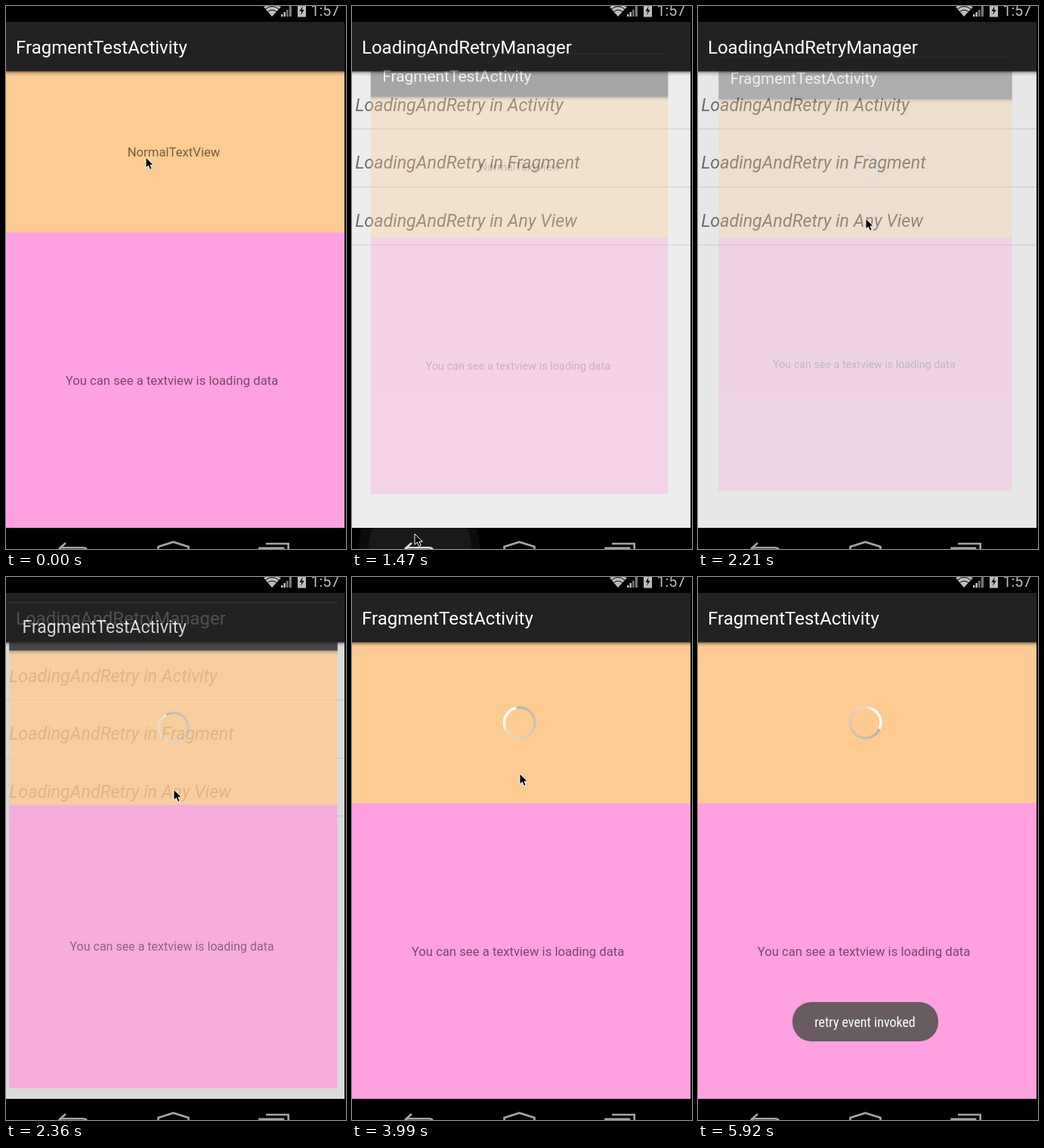
These frames come from a looping animation (450 px wide and 718 px high, 5.99 s). An HTML page:

```html
<!DOCTYPE html>
<html lang="en">
<head>
<meta charset="utf-8">
<title>Loading and retry</title>
<style>
  html, body { margin: 0; width: 100%; height: 100%; overflow: hidden; background: #000; }
  svg { display: block; width: 100%; height: 100%; }
  text { font-family: Roboto, sans-serif; }
  .title { font-size: 24px; fill: #fff; }
  .item { font-size: 23.25px; font-style: italic; fill: #000; fill-opacity: .54; }
  .label { font-size: 16.7px; fill: #000; fill-opacity: .54; text-anchor: middle; }
  .toast { font-size: 18px; font-stretch: condensed; font-family: "Roboto Condensed", Roboto, sans-serif; fill: #fff; text-anchor: middle; }
</style>
</head>
<body>
<svg viewBox="0 0 450 718">
  <defs>
    <linearGradient id="shade" x1="0" y1="0" x2="0" y2="1">
      <stop offset="0" stop-color="#000" stop-opacity=".5"/>
      <stop offset=".4" stop-color="#000" stop-opacity=".14"/>
      <stop offset="1" stop-color="#000" stop-opacity="0"/>
    </linearGradient>
    <clipPath id="navClip"><rect y="690" width="448" height="28"/></clipPath>
  </defs>

  <g id="list">
    <rect y="20" width="448" height="670" fill="#ededed"/>
    <rect y="20" width="448" height="66.5" fill="#222"/>
    <rect y="86.5" width="448" height="6" fill="url(#shade)"/>
    <text class="title" x="13" y="62.7">LoadingAndRetryManager</text>
    <text class="item" x="4.2" y="138.5">LoadingAndRetry in Activity</text>
    <text class="item" x="4.2" y="215.2">LoadingAndRetry in Fragment</text>
    <text class="item" x="4.2" y="292">LoadingAndRetry in Any View</text>
    <path d="M0 162.5H448M0 239.5H448M0 316H448" stroke="#cfcfcf" fill="none"/>
  </g>
  <rect id="dim" y="87" width="448" height="603"/>

  <g id="page">
    <rect x="-5" y="20" width="453" height="66.5" fill="#222"/>
    <rect x="-5" y="20" width="453" height="1" fill="#4a4a4a"/>
    <rect x="-5" y="86.5" width="453" height="213" fill="#fecb92"/>
    <rect x="-5" y="299.3" width="453" height="390.7" fill="#ffa1e0"/>
    <rect x="-5" y="86.5" width="453" height="6" fill="url(#shade)"/>
    <text class="title" x="13" y="62.7">FragmentTestActivity</text>
    <text class="label" id="content" x="222" y="199">NormalTextView</text>
    <text class="label" x="219.5" y="500.5">You can see a textview is loading data</text>
    <g id="spinner" transform="translate(221.7 192.7)" fill="none" stroke-width="3.4"></g>
  </g>

  <g id="toast">
    <rect x="125" y="562" width="193" height="52" rx="25" fill="#665c62"/>
    <text class="toast" x="221" y="595">retry event invoked</text>
  </g>

  <rect width="450" height="21"/>
  <rect x="448" width="2" height="718"/>
  <rect y="690" width="450" height="28"/>

  <g fill="#bdbdbd">
    <path d="M352 14L341 1L344 0H360L364 1Z"/>
    <path d="M343.5 4Q352 -3 361 4M346.5 7.5Q352 3 358 7.5" fill="none" stroke="#000" stroke-width="1"/>
    <path d="M364 14V11H366.5V14ZM367.5 14V8H370V14Z"/>
    <path d="M371 14V5H373.5V14ZM374.7 14V0H378V14Z" fill="#777"/>
    <path d="M386 0H397V14.5H386Z"/>
    <path d="M392.5 0L388.5 7H391.3L390 12L394.7 5H392Z" fill="#111"/>
    <text x="403.5" y="13" font-size="19.5">1:57</text>
  </g>

  <g id="ripple" clip-path="url(#navClip)">
    <circle cx="89" cy="717" r="80" fill="#1b1b1b"/>
    <circle cx="90" cy="717" r="68" fill="#353535"/>
  </g>
  <g fill="none" stroke="#a5a5a5" stroke-width="2.6">
    <path id="back" d="M79 710L71 717L73 719M72 716.3H102Q106 716.3 107 719"/>
    <path d="M201.5 719V715L221.5 708.7L241.5 715V719"/>
    <path d="M344 711H373.7V719M335.5 719V716.7H367V719"/>
  </g>
  <path id="cursor" d="M0 0V14.2L3.3 11.2L5.6 16.4L8.2 15.2L6 10.2H10.4Z" stroke="#fff" stroke-width="1"/>
</svg>

<script>
const LOOP = 5990, FIRST = 580, TICK = 147.6;
const CLOSE = 1276, OPEN = 2120, RETRY = 4130, RELOAD = 4500;
const PARTS = 60, STEP = 360 / PARTS, RADIUS = 20.2;
const NS = "http://www.w3.org/2000/svg";

const $ = id => document.getElementById(id);
const fade = (id, v) => $(id).setAttribute("opacity", v);
const rad = a => a * Math.PI / 180;
const ramp = (t, start, length) => Math.min(1, Math.max(0, (t - start) / length));
const mix = (a, b, k) => a.map((v, i) => v + (b[i] - v) * k);

const point = a => `${RADIUS * Math.cos(rad(a))} ${RADIUS * Math.sin(rad(a))}`;
const segs = Array.from({ length: PARTS }, (_, i) => {
  const p = document.createElementNS(NS, "path");
  p.setAttribute("d", `M${point(i * STEP)}A${RADIUS} ${RADIUS} 0 0 1 ${point((i + 1) * STEP + .6)}`);
  return $("spinner").appendChild(p);
});

// Grey sweep turning one way, white tail swelling as the second layer passes
function drawSpinner(t) {
  const again = t > RELOAD;
  const dt = t - (again ? 5894 : 2794);
  const start = (again ? 25 : 145) - .2115 * dt;
  const tail = 55 + 55 * Math.cos(rad((again ? 0 : 95) + .514 * dt));
  segs.forEach((p, i) => {
    const a = (((i + .5) * STEP - start) % 360 + 360) % 360;
    const grey = mix([184, 178, 174], [238, 219, 200], ramp(a, 0, 270));
    const c = mix(grey, [255, 255, 255], ramp(a, 360 - tail, 25));
    p.setAttribute("stroke", `rgb(${c.map(Math.round)})`);
  });
}

// Pointer: rest on the page, press back, pick a row, drift, leave
const moves = [
  { at: 480, length: 700, to: [83, 698] },
  { at: 1620, length: 280, to: [222, 281] },
  { at: 2360, length: 290, to: [222, 260] },
  { at: 4430, length: 420, to: [460, 730] }
];
const pointer = t => moves.reduce((p, m) => mix(p, m.to, ramp(t, m.at, m.length)), [185, 200]);

function render(now) {
  const time = now % LOOP;
  // The screen refreshes in even ticks after a pause
  const t = Math.max(0, FIRST + TICK * Math.floor((time - FIRST) / TICK));

  const opening = ramp(t, OPEN, 290);
  const shown = 1 - ramp(t, CLOSE, 290) + opening;
  $("page").setAttribute("transform", `translate(221.5 348) scale(${.8 + .2 * shown}) translate(-221.5 -348)`);
  fade("page", shown);
  fade("dim", .1 * opening);
  fade("ripple", ramp(t, 1030, 280) - ramp(t, 1320, 280));
  fade("toast", ramp(t, 4750, 390));
  $("back").setAttribute("stroke", t > 1100 && t < 1600 ? "#ddd" : "#a5a5a5");

  const loading = t > OPEN && (t < RETRY - 10 || t > RELOAD);
  fade("content", t < OPEN ? 1 : 0);
  fade("spinner", loading ? 1 : 0);
  if (loading) drawSpinner(t);
  $("cursor").setAttribute("transform", `translate(${pointer(t)})`);
}

const begin = performance.now();
function loop() {
  render(performance.now() - begin);
  requestAnimationFrame(loop);
}
loop();
</script>
</body>
</html>
```
